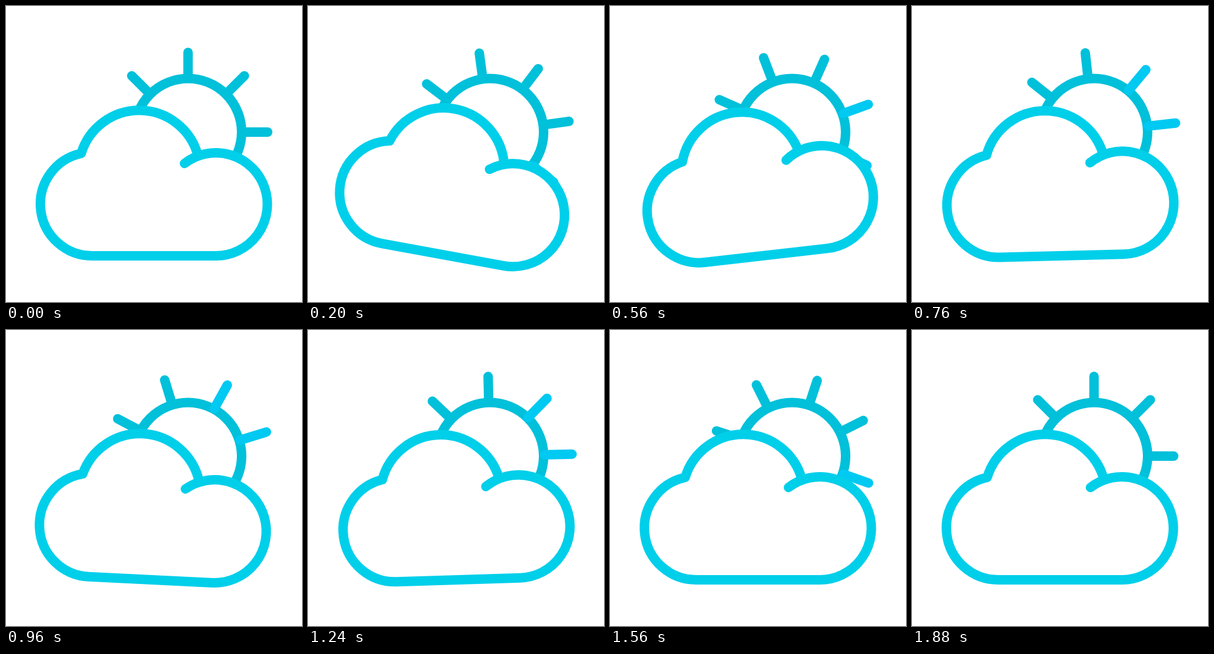
Write an HTML page that moves like this. It is 500 px wide and 500 px high and loops after 2 s.

```html
<!DOCTYPE html>
<html lang="en">
<head>
<meta charset="utf-8">
<title>Sun and cloud</title>
<style>
  html, body { margin: 0; width: 100%; height: 100%; overflow: hidden; background: #fff; }
  svg { display: block; width: 100%; height: 100%; }
</style>
</head>
<body>
<svg viewBox="0 0 500 500" fill="none" stroke-width="16" stroke-linecap="round" stroke-linejoin="round">
  <circle cx="307.5" cy="213" r="90.5" stroke="#00c0da"/>
  <g id="rays">
    <path id="dark" stroke="#00c0da"/>
    <path id="bright" stroke="#00c9f2"/>
  </g>
  <path id="cloud" fill="#fff" stroke="#00cfea"
    d="M324 252A102.5 102.5 0 0 0 127 249A87.5 87.5 0 0 0 146 422H354.5A87 87 0 1 0 301.5 266"/>
</svg>
<script>
const LOOP = 2000, STEP = 40;
const SUN = [307.5, 213];
const byId = id => document.getElementById(id);

// [time in ms, angle in degrees]
const rayKeys = [[0, 0], [995, -107.3], [1870, 0]];
const cloudKeys = [[0, 0], [330, 15], [590, -7], [910, 3], [1220, -1.8], [1520, 0]];

function ray(degrees, reach = 134.5) {
  const a = degrees * Math.PI / 180;
  const point = r => [SUN[0] + r * Math.cos(a), SUN[1] + r * Math.sin(a)];
  return `M${point(92)}L${point(reach)}`;
}
byId('dark').setAttribute('d', [0, -45, -90, -135].map(a => ray(a)).join(''));
byId('bright').setAttribute('d', ray(46, 137) + ray(90, 138.5));

function ease(u) {
  const a = u ** 1.85, b = (1 - u) ** 1.85;
  return a / (a + b);
}

function angleAt(keys, t) {
  const i = keys.findIndex(k => k[0] > t);
  if (i < 0) return keys[keys.length - 1][1];
  const [t0, a0] = keys[i - 1], [t1, a1] = keys[i];
  return a0 + (a1 - a0) * ease((t - t0) / (t1 - t0));
}

const turn = (id, angle, x, y) => byId(id).setAttribute('transform', `rotate(${angle} ${x} ${y})`);

function draw() {
  const t = Math.floor(performance.now() % LOOP / STEP) * STEP;
  turn('rays', angleAt(rayKeys, t), ...SUN);
  turn('cloud', angleAt(cloudKeys, t), 250, 299);
  requestAnimationFrame(draw);
}
draw();
</script>
</body>
</html>
```
